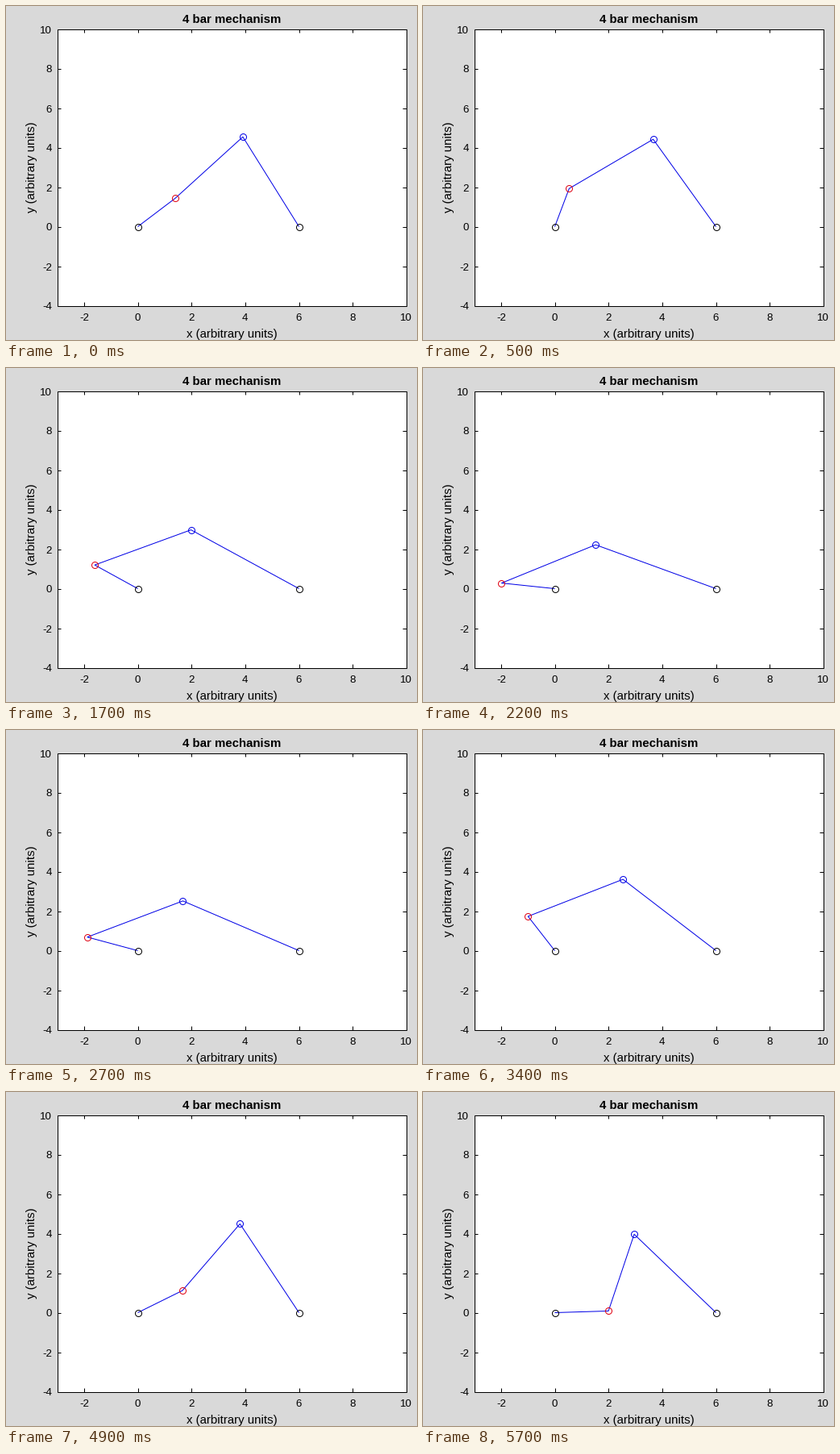
Animation of 510x414 px, one loop 5.9 s. Source, as a matplotlib script:

```python
import numpy as np
import matplotlib.pyplot as plt
from matplotlib.animation import FuncAnimation
from matplotlib.patches import Rectangle

W, H, DPI = 510, 414, 64  # a power of two keeps the pixel size exact
PX = 72 / DPI  # points per pixel
plt.rcParams["font.family"] = "Liberation Sans"

CRANK, COUPLER, ROCKER, GROUND = 2, 4, 5, 6
STEP = 0.05
# crank sweeps up to pi and back down
ANGLES = np.concatenate([np.arange(0, np.pi, STEP), np.arange(np.pi, 0, -STEP)])
START, STRIDE, FRAMES = 16, 2, 59

LEFT, RIGHT, TOP, BOTTOM = 63.5, 496.5, 28.5, 371.5
BLUE, RED = "#0000e6", "#e00010"


def to_px(x, y):
    return 163.5 + 33.34 * x, 273.5 - 24.5 * y


def joints(theta):
    """Crank pin and coupler joint for a crank angle."""
    a = CRANK * np.array([np.cos(theta), np.sin(theta)])
    to_ground = np.array([GROUND, 0]) - a
    d = np.hypot(*to_ground)
    u = to_ground / d
    along = (d**2 + COUPLER**2 - ROCKER**2) / (2 * d)
    off = np.sqrt(COUPLER**2 - along**2)
    return a, a + along * u + off * np.array([-u[1], u[0]])


fig = plt.figure(figsize=(W / DPI, H / DPI), dpi=DPI, facecolor="#d9d9d9")
ax = fig.add_axes([0, 0, 1, 1])
ax.set_xlim(0, W)
ax.set_ylim(H, 0)
ax.axis("off")


def segment(xs, ys, color="black", z=2):
    return ax.plot(xs, ys, color=color, lw=PX, solid_capstyle="butt", zorder=z)[0]


def ring(x, y, color):
    return ax.plot([x], [y], "o", ms=8 * PX, mfc="none", mec=color,
                   mew=PX, zorder=4)[0]


def label(x, y, s, size, ha="center", **kw):
    ax.text(x, y, s, fontsize=size * PX, ha=ha, va="baseline", **kw)


ax.add_patch(Rectangle((LEFT, TOP), RIGHT - LEFT, BOTTOM - TOP,
                       fc="white", ec="black", lw=PX, zorder=1))

for v in range(-2, 11, 2):
    x = min(to_px(v, 0)[0], RIGHT)
    segment([x, x], [BOTTOM, BOTTOM - 4.5])
    segment([x, x], [TOP, TOP + 4.5])
    label(x, 390, str(v), 13.3)

for v in range(-4, 11, 2):
    y = to_px(0, v)[1]
    segment([LEFT, LEFT + 4.5], [y, y])
    segment([RIGHT, RIGHT - 4.5], [y, y])
    label(57, y + 5, str(v), 13.3, ha="right")

label(280, 21, "4 bar mechanism", 15, weight="bold")
label(280, 411, "x (arbitrary units)", 15)
label(36, 199.5, "y (arbitrary units)", 15, rotation=90, rotation_mode="anchor")

links = segment([], [], BLUE, 3)
for gx in (0, GROUND):
    ring(*to_px(gx, 0), "black")
pin = ring(0, 0, RED)
joint = ring(0, 0, BLUE)


def update(i):
    theta = ANGLES[min(START + STRIDE * i, len(ANGLES) - 1)]
    a, b = joints(theta)
    pts = [to_px(*p) for p in ((0, 0), a, b, (GROUND, 0))]
    links.set_data(*zip(*pts))
    pin.set_data([pts[1][0]], [pts[1][1]])
    joint.set_data([pts[2][0]], [pts[2][1]])
    return links, pin, joint


anim = FuncAnimation(fig, update, frames=FRAMES, interval=100,
                     init_func=lambda: update(0), repeat=True, repeat_delay=0)
plt.show()
```
